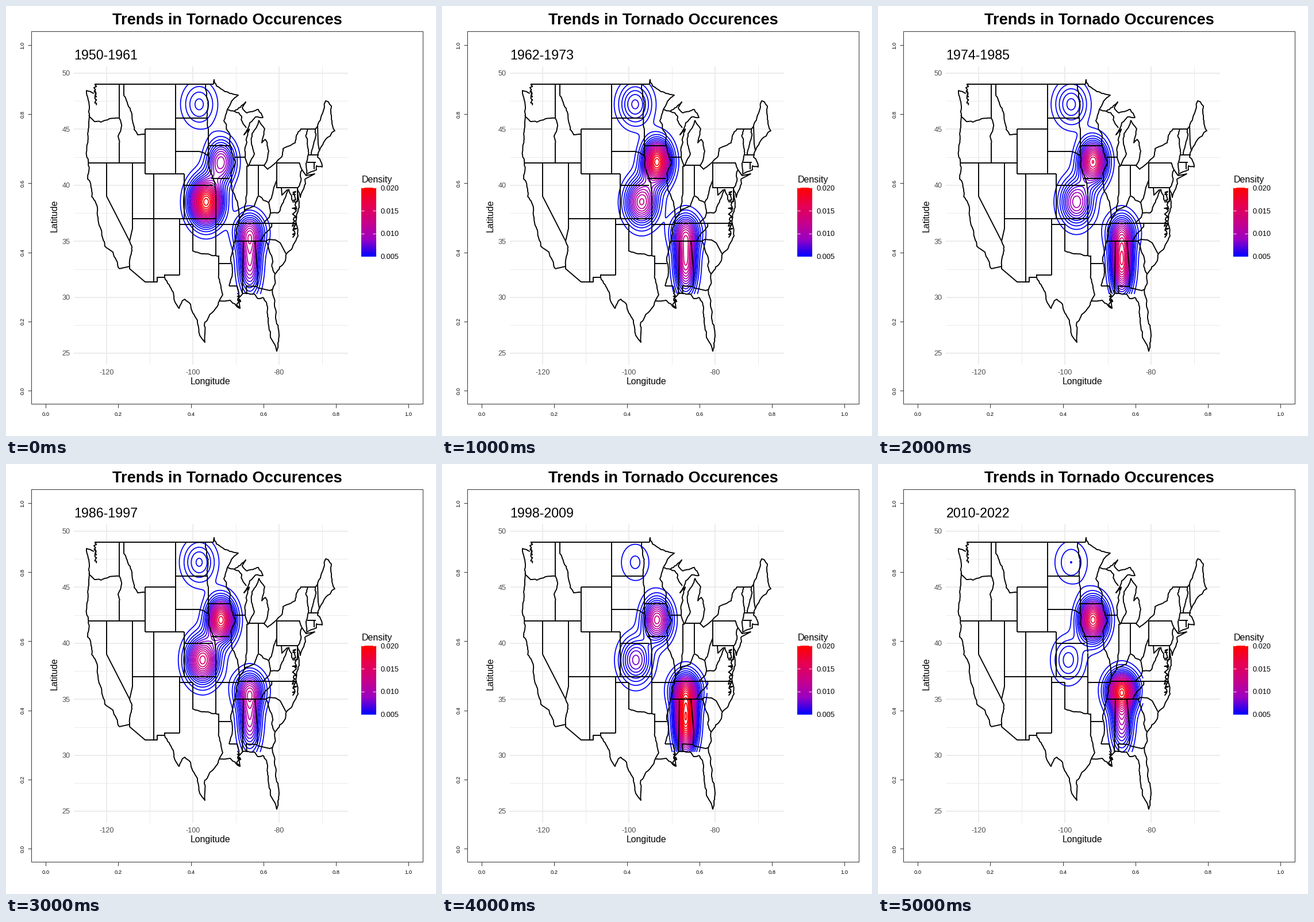
Recreate the animation shown at these times as a matplotlib script. Size 748 by 748 pixels, loop 6 s.

```python
import math
import numpy as np
import matplotlib.pyplot as plt
from matplotlib.animation import FuncAnimation
from matplotlib.colors import LinearSegmentedColormap, Normalize

PX = 0.72  # points per pixel at 100 dpi
SIZE = 748
rng = np.random.default_rng(4)

plt.rcParams["font.family"] = "Liberation Sans"
fig = plt.figure(figsize=(SIZE / 100, SIZE / 100), dpi=100, facecolor="white")
ax = fig.add_axes([0, 0, 1, 1])
ax.axis("off")

# blue to red, blended in Lab space
ramp = LinearSegmentedColormap.from_list(
    "density", ["#0000FF", "#9B00C2", "#C90088", "#E70050", "#FF0000"])


def lon_x(lon):
    return 1075 + 7.5 * lon


def lat_y(lat):
    return 1091.5 - 19.5 * lat


def stroke(xs, ys, color="black", width=1.9, z=5):
    ax.plot(xs, ys, color=color, lw=width * PX, zorder=z,
            solid_capstyle="butt", solid_joinstyle="round")


def label(x, y, s, px, color="black", ha="center", **kw):
    return ax.text(x, y, s, fontsize=px * PX, color=color, ha=ha,
                   va="baseline", rotation_mode="anchor", **kw)


def line(*pts):
    stroke(*zip(*pts))


def fractal(p, q):
    """Points after p up to q, split by random midpoint displacement."""
    d = q - p
    if math.hypot(*d) < 5:
        return [q]
    mid = (p + q) / 2 + rng.normal(0, 0.06) * np.array([-d[1], d[0]])
    return fractal(p, mid) + fractal(mid, q)


def rough(*pts):
    pts = np.array(pts, float)
    out = [pts[0]]
    for p, q in zip(pts, pts[1:]):
        out += fractal(p, q)
    stroke(*zip(*out))


def inlets(x, y0, y1, spread):
    """Tangled shore of a sound or bay."""
    ys = np.arange(y0, y1, 2.0)
    stroke(x + rng.uniform(-spread, spread, len(ys)),
           ys + rng.normal(0, 1.5, len(ys)))


def outer_frame():
    dark = "#333333"
    left, top, right, low = 43.6, 43.6, 725.2, 692.2
    line_x, line_y = [left, right, right, left, left], [top, top, low, low, top]
    stroke(line_x, line_y, dark, 1)
    for k in range(6):
        x, y, s = 69.3 + 126.2 * k, 669 - 120.2 * k, f"{k / 5:.1f}"
        stroke([x, x], [low, low + 7], dark, 1)
        stroke([left - 6, left], [y, y], dark, 1)
        label(x, 713, s, 9.4)
        label(31.5, y, s, 9.4, rotation=90)
    label(384.5, 32, "Trends in Tornado Occurences", 27.2, weight="bold")


def panel():
    pale, grey = "#EBEBEB", "#4D4D4D"
    for k in range(11):
        y = lat_y(50 - 2.5 * k)
        stroke([118, 595], [y, y], pale, 1 if k % 2 else 1.9, 1)
        if k % 2 == 0:
            label(111.5, y + 4.5, str(50 - k * 5 // 2), 12.6, grey, "right")
    for k in range(6):
        x = lon_x(-120 + 10 * k)
        stroke([x, x], [105, 624], pale, 1 if k % 2 else 1.9, 1)
        if k % 2 == 0:
            label(x, 641, str(-120 + 10 * k), 12.6, grey)
    label(356, 658, "Longitude", 15.9)
    label(89, 365, "Latitude", 15.9, rotation=90)


def legend():
    label(618.5, 307, "Density", 16, ha="left")
    ax.imshow(np.linspace(1, 0, 120)[:, None], cmap=ramp, aspect="auto",
              extent=(618, 643.5, 436, 316), zorder=3)
    for k in range(4):
        y = 316.3 + 39.8 * k
        for x in (618, 638.5):
            stroke([x, x + 5], [y, y], "white", 0.9, 4)
        label(652, y + 4.5, f"{0.020 - 0.005 * k:.3f}", 12.7, ha="left")


def straight_borders():
    # latitude, west end, east end
    for lat, w, e in [
            (49, -122.8, -95.2), (46, -104, -96.5), (45, -111, -104),
            (45, -75, -71.6), (43.5, -96.4, -91.2), (43, -104, -98.5),
            (42.7, -73.3, -70.8), (42.5, -90.4, -87.9), (42, -124.2, -111),
            (42, -80.5, -75.3), (42.05, -73.5, -71.4), (41.75, -86.9, -83.4),
            (41, -111, -102), (40.6, -95.7, -91.4), (40, -102, -95.3),
            (39.75, -80.5, -75.7), (37, -114, -94.6), (36.5, -103, -100),
            (36.5, -94.6, -89.4), (36.6, -89.4, -75.9), (35, -90.3, -83.1),
            (33, -94, -91.2), (32, -106.6, -103), (31, -91.6, -89.7)]:
        stroke([lon_x(w), lon_x(e)], [lat_y(lat)] * 2)
    # longitude, south end, north end
    for lon, s, n in [
            (-120, 39, 42), (-117, 46, 49), (-117, 42, 43.8), (-116, 48, 49),
            (-114, 36.1, 42), (-111, 41, 45), (-109.05, 31.3, 41),
            (-104, 41, 49), (-103, 32, 37), (-102, 37, 41), (-100, 34.1, 36.5),
            (-96.4, 43.5, 45), (-94.6, 33.7, 39.1), (-94, 32, 33.7),
            (-87.5, 39.3, 41.7), (-84.8, 39.1, 41.75), (-80.5, 39.7, 42),
            (-75.7, 38.5, 39.8), (-71.8, 41.4, 42.05)]:
        stroke([lon_x(lon)] * 2, [lat_y(s), lat_y(n)])


def coasts():
    inlets(155, 137, 173, 2.5)
    rough((153, 152), (140, 147), (145, 179), (143, 215), (140, 259),
          (144, 288), (142, 301), (149, 319), (156, 342), (160, 368),
          (166, 390), (172, 418), (186, 428), (197, 457))
    line((197, 457), (215, 453), (215, 457), (242, 480), (263, 480),
         (263, 472), (276, 472), (276, 467))
    rough((276, 472), (291, 498), (301, 526), (311, 510), (321, 519),
          (333, 547), (337, 573), (346, 585), (345, 556), (355, 536),
          (371, 513), (390, 512), (400, 521), (407, 526), (403, 510),
          (412, 500), (432, 501), (438, 509), (447, 507), (455, 525),
          (456, 549), (465, 585), (471, 601))
    inlets(405, 498, 524, 4)
    rough((471, 601), (475, 572), (467, 520), (463, 495), (468, 466),
          (486, 443), (488, 431), (500, 415), (508, 400), (505, 371),
          (510, 350), (507, 318), (512, 333), (521, 309), (520, 301))
    inlets(502, 322, 406, 4)
    line((520, 301), (537, 292), (522, 295), (515, 285))
    rough((522, 293), (540, 285), (540, 278), (550, 280), (548, 271),
          (542, 263), (546, 250), (556, 232), (564, 226), (572, 217),
          (567, 200), (566, 174), (561, 167), (556, 165), (554, 176),
          (550, 188), (542, 209), (538, 214))


def lake_shores():
    rough((513, 214), (503, 238), (482, 248), (480, 262), (464, 277),
          (455, 284), (449, 278), (457, 253), (451, 232), (445, 238),
          (450, 214), (440, 199), (428, 222), (427, 240), (430, 262),
          (421, 279), (416, 264), (419, 228), (423, 214), (414, 224),
          (424, 203), (434, 193), (447, 194), (439, 180), (419, 186),
          (411, 177), (417, 167), (397, 183), (385, 180), (404, 155),
          (381, 149), (366, 139), (362, 128), (361, 136))


def rivers():
    rough((144, 190), (154, 201), (165, 202), (180, 196), (197, 195),
          (201, 206), (195, 226), (198, 237))
    rough((205, 156), (216, 178), (221, 204), (229, 224), (242, 223))
    line((175, 331), (215, 409), (220, 387))
    rough((215, 409), (218, 431), (215, 453))
    rough((347, 136), (351, 180), (352, 214))
    rough((336, 253), (352, 260), (356, 290), (365, 328))
    line((352, 243), (352, 260))
    rough((325, 426), (345, 431), (370, 436))
    rough((370, 468), (374, 490), (371, 513))
    rough((385, 180), (379, 200), (390, 226), (392, 250), (399, 270),
          (391, 291), (391, 306), (399, 333), (406, 372), (398, 409),
          (391, 437), (394, 463), (388, 487))
    rough((397, 183), (410, 192), (418, 212))
    rough((419, 325), (415, 356))
    rough((406, 372), (417, 354), (432, 348), (439, 330), (457, 342),
          (464, 326), (471, 303))
    rough((457, 342), (460, 360), (448, 377))
    rough((460, 360), (473, 360), (485, 335), (492, 319), (500, 342))
    line((479, 316), (480, 329), (490, 319))
    rough((443, 409), (462, 384), (462, 378))
    rough((452, 409), (463, 438), (468, 466))
    line((452, 409), (457, 406), (469, 407), (477, 412), (487, 431))
    rough((507, 317), (513, 305), (512, 296), (515, 285), (510, 272))
    rough((523, 291), (526, 258), (525, 214))
    rough((531, 258), (538, 214))
    line((542, 208), (543, 240), (545, 251))
    line((413, 409), (412, 470), (411, 500))
    line((433, 409), (438, 465), (437, 488), (418, 487), (419, 501))
    line((437, 490), (459, 495), (463, 493))
    line((402, 487), (405, 499))


# Density is a sum of Gaussian clusters: centre and spread in pixels.
CLUSTERS = [(336, 171, 19, 25), (374, 271, 15.5, 24), (348, 341, 18, 26),
            (424, 394, 17, 21), (424, 445, 12, 36)]
WEST_PLAINS = 2
# Peak of each cluster in thousandths, one row per period.
PEAKS = [(4.3, 10.6, 21.5, 8.5, 11), (6.3, 20.5, 13.2, 8, 14),
         (5.4, 17, 10.7, 7, 17), (5.2, 18.5, 15.5, 9, 10.5),
         (2.2, 13.5, 8.4, 10, 22.5), (3.005, 18.5, 4.5, 17.5, 10)]
GX, GY = np.meshgrid(np.arange(295, 461.5), np.arange(136, 501.5))


def density(i):
    z = 0
    for k, (x, y, sx, sy) in enumerate(CLUSTERS):
        if k == WEST_PLAINS:
            x -= 0.68 * i ** 2  # this cluster drifts west ever faster
        z = z + PEAKS[i][k] * np.exp(-((GX - x) / sx) ** 2 / 2
                                     - ((GY - y) / sy) ** 2 / 2)
    return z


def years(i):
    start = 1950 + 12 * i
    return f"{start}-{2022 if i == 5 else start + 11}"


for draw in (outer_frame, panel, legend, straight_borders, coasts,
             lake_shores, rivers):
    draw()

rings = [ax.contour(GX, GY, density(i), levels=range(1, 31), cmap=ramp,
                    norm=Normalize(5, 20, clip=True),
                    linewidths=1.75 * PX, zorder=3)
         for i in range(len(PEAKS))]
title = label(118.5, 92.5, "", 23.2, ha="left")
ax.set_xlim(0, SIZE)
ax.set_ylim(SIZE, 0)


def show(i):
    for k, ring in enumerate(rings):
        ring.set_visible(k == i)
    title.set_text(years(i))
    return [*rings, title]


anim = FuncAnimation(fig, show, frames=len(PEAKS), interval=1000,
                     init_func=lambda: show(0), repeat=True, repeat_delay=0)
plt.show()
```
